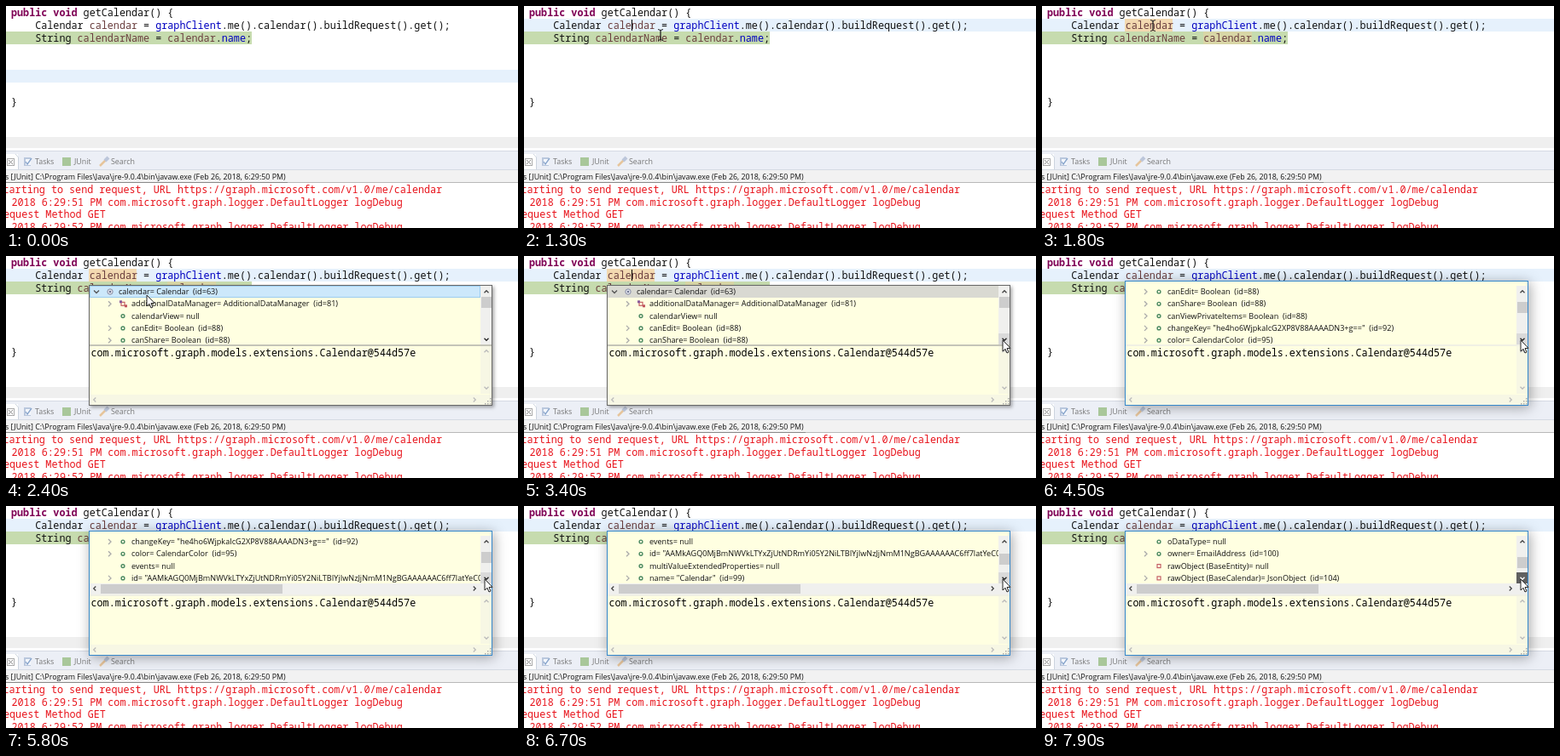
An HTML page with a canvas that plays this animation: 600 px wide and 261 px high, repeating every 8 s.

```html
<!DOCTYPE html>
<html lang="en">
<head>
<meta charset="utf-8">
<title>Inspecting a variable</title>
<style>
html, body { margin: 0; width: 100%; height: 100%; overflow: hidden; background: #fff; }
canvas { display: block; }
</style>
</head>
<body>
<canvas id="stage" width="600" height="261"></canvas>
<script>
const ctx = document.getElementById('stage').getContext('2d');
const LOOP = 8000, ROW = 14.3;
const MONO = '11.76px "Noto Sans Mono", monospace';
const UI = '9.1px "Open Sans", sans-serif';
const SMALL = '8.9px "Open Sans", sans-serif';
const BROWN = '#6a3e3e', BLUE = '#0000c0', RED = '#e8141c';

const CLICK = 1150, MARK = 1700, OPEN = 2050, FOCUS = 3850, HBAR = 5000;
// Each press of the scroll button moves the list by one row.
const PRESSES = [3900, 4130, 4350, 4700, HBAR, 5650, 6100, 6500, 6850, 7150, 7500, 7840];

// Pointer stops: time, x, y
const PATH = [
  [100, 456, 255], [850, 128, 22], [1160, 128, 22], [1290, 160, 34], [1400, 160, 34],
  [1650, 130, 23], [2080, 130, 23], [2330, 165, 46], [2750, 165, 46],
  [3350, 561, 99], [5450, 561, 99], [5600, 561, 86], [LOOP, 561, 86]
];

// Label, icon, expandable
const ROWS = [
  ['calendar= Calendar  (id=63)', 'local', 1],
  ['additionalDataManager= AdditionalDataManager  (id=81)', 'private', 1],
  ['calendarView= null', 'public', 0],
  ['canEdit= Boolean  (id=88)', 'public', 1],
  ['canShare= Boolean  (id=88)', 'public', 1],
  ['canViewPrivateItems= Boolean  (id=88)', 'public', 1],
  ['changeKey= "he4ho6WjpkaIcG2XP8V88AAAADN3+g=="  (id=92)', 'public', 1],
  ['color= CalendarColor  (id=95)', 'public', 1],
  ['events= null', 'public', 0],
  ['id= "AAMkAGQ0MjBmNWVkLTYxZjUtNDRmYi05Y2NiLTBIYjIwNzJjNmM1NgBGAAAAAAC6ff7latYeC0', 'public', 1],
  ['multiValueExtendedProperties= null', 'public', 0],
  ['name= "Calendar"  (id=99)', 'public', 1],
  ['oDataType= null', 'public', 0],
  ['owner= EmailAddress  (id=100)', 'public', 1],
  ['rawObject (BaseEntity)= null', 'hidden', 0],
  ['rawObject (BaseCalendar)= JsonObject  (id=104)', 'hidden', 1]
];

function box(x, y, w, h, color) {
  ctx.fillStyle = color;
  ctx.fillRect(x, y, w, h);
}

function frame(x, y, w, h, color) {
  ctx.strokeStyle = color;
  ctx.lineWidth = 1;
  ctx.strokeRect(x + .5, y + .5, w - 1, h - 1);
}

function text(str, x, y, font, color = '#111') {
  ctx.font = font;
  ctx.fillStyle = color;
  ctx.fillText(str, x, y);
  return x + ctx.measureText(str).width;
}

function code(x, y, ...parts) {
  for (const [str, color = '#111', bold] of parts)
    x = text(str, x, y, (bold ? 'bold ' : '') + MONO, color);
}

function line(points, color, width = 1) {
  ctx.beginPath();
  points.forEach(([x, y]) => ctx.lineTo(x, y));
  ctx.strokeStyle = color;
  ctx.lineWidth = width;
  ctx.stroke();
}

// dx, dy give the direction in which the chevron points
function chevron(x, y, dx, dy, color = '#999', s = 2.5) {
  const tail = k => [x - dx * s / 2 + k * dy * s, y - dy * s / 2 + k * dx * s];
  line([tail(-1), [x + dx * s / 2, y + dy * s / 2], tail(1)], color, 1.3);
}

function editor(t) {
  const y = t < CLICK ? 75 : 15;
  box(0, y, 600, 15, '#e6f1fc');
  box(0, 30, 288, 15, '#c6dbae');
  if (t >= MARK && t < FOCUS) {
    box(97, 15, 56, 15, '#f3d9b0');
    box(189, 30, 57, 15, '#d8d6a6');
  }
  code(6, 12, ['public void', '#7f0055', 1], [' getCalendar() {']);
  code(34.2, 27, ['Calendar '], ['calendar', BROWN], [' = '], ['graphClient', BLUE],
    ['.me().calendar().buildRequest().get();']);
  code(34.2, 42, ['String '], ['calendarName', BROWN], [' = '], ['calendar', BROWN],
    ['.'], ['name', BLUE], [';']);
  code(6, 117, ['}']);
  if (t >= CLICK && t < 1700 || t >= 2900 && t < 3700) box(126, 16, 1, 13, '#000');
}

function consolePane() {
  box(0, 154, 600, 13, '#efefef');
  box(0, 170, 600, 23, '#eceff6');
  box(0, 170, 600, 1, '#d5dae4');
  box(0, 174, 14, 19, '#fff');
  line([[11, 174], [14.5, 178], [14.5, 192]], '#ccd4de');
  frame(1, 179, 9, 9, '#aaa');
  line([[3, 181], [8, 186]], '#888');
  line([[8, 181], [3, 186]], '#888');

  box(21, 178, 8, 10, '#b9c7dd');
  box(23, 180, 6, 7, '#f4f7fc');
  line([[23, 183], [25, 186], [30, 179]], '#88a5cc', 1.3);
  text('Tasks', 34, 186, SMALL, '#777');
  box(66, 178, 10, 10, '#a9c79a');
  text('JUnit', 80, 186, SMALL, '#777');
  line([[110, 188], [117, 181]], '#e6c59c', 2.5);
  line([[116, 182], [120, 178]], '#bcc6da', 4);
  text('Search', 123, 186, SMALL, '#777');

  box(0, 193, 600, 14, '#f2f2f2');
  box(0, 192, 600, 1, '#d5dbe3');
  text('s [JUnit] C:\\Program Files\\Java\\jre-9.0.4\\bin\\javaw.exe (Feb 26, 2018, 6:29:50 PM)',
    -1, 204, SMALL);
  box(0, 207, 600, 1, '#b9b9b9');
  box(0, 207, 330, 1, '#888');

  const logger = ' PM com.microsoft.graph.logger.DefaultLogger logDebug';
  text('tarting to send request, URL https://graph.microsoft.com/v1.0/me/calendar', -3.5, 220, MONO, RED);
  text('2018 6:29:51' + logger, 6.5, 234.5, MONO, RED);
  text('equest Method GET', -3, 249, MONO, RED);
  text('2018 6:29:52' + logger, 6.5, 264, MONO, RED);
}

function icon(kind, x, y) {
  if (kind === 'local') {
    ctx.beginPath();
    ctx.arc(x, y, 3.2, 0, 7);
    ctx.fillStyle = '#d9dce6';
    ctx.fill();
    ctx.strokeStyle = '#8a8fa6';
    ctx.lineWidth = 1;
    ctx.stroke();
    box(x - 1, y - 1, 2, 2, '#6d7390');
  } else if (kind === 'public') {
    ctx.beginPath();
    ctx.arc(x, y, 1.9, 0, 7);
    ctx.strokeStyle = '#4c8a62';
    ctx.lineWidth = 1.4;
    ctx.stroke();
  } else {
    ctx.strokeStyle = '#c0545c';
    ctx.lineWidth = 1.1;
    ctx.strokeRect(x - 2, y - 2, 4, 4);
    if (kind === 'private') {
      box(x - 4, y - 4, 3, 3, '#8a5a9a');
      box(x + 2, y + 1, 3, 3, '#c0545c');
    }
  }
}

function popup(t) {
  const pos = PRESSES.filter(p => t >= p).length;
  const hbar = t >= HBAR, focused = t >= FOCUS;
  const hot = t >= 2280 && t < 2830;
  const top = focused ? 29 : 34, bottom = hbar ? 91 : 104;
  const pressed = PRESSES.some(p => t >= p - 30 && t < p + 110);

  ctx.save();
  ctx.shadowColor = 'rgba(0,0,0,.35)';
  ctx.shadowBlur = focused ? 14 : 4;
  ctx.shadowOffsetX = ctx.shadowOffsetY = 2;
  box(97, top, 473, 176 - top, '#ffffe1');
  ctx.restore();

  ctx.save();
  ctx.beginPath();
  ctx.rect(98, 35, 458, bottom - 35);
  ctx.clip();
  if (pos === 0) {
    box(98, 35, 458, 14, hot ? '#cce8fb' : '#d9d9d2');
    if (hot) frame(98, 35, 458, 14, '#9ccdf0');
  }
  ROWS.slice(pos, pos + 5).forEach(([label, kind, opens], i) => {
    const y = 42 + i * ROW, root = kind === 'local', x = root ? 122 : 137;
    if (root) chevron(106, y, 0, 1, '#555', 3);
    else if (opens) chevron(121.5, y, 1, 0, '#aaa', 3);
    icon(kind, x, y);
    text(label, x + 10, y + 3, UI);
  });
  ctx.restore();

  // List scroll bars
  box(556, 35, 13, bottom - 35, '#f0f0ee');
  chevron(563, 42, 0, -1, '#444');
  box(557, 48 + pos * (hbar ? 1 : 2), 12, 13, '#cdcdcd');
  if (t >= 3300) box(556, bottom - 13, 13, 13, pressed ? '#606060' : '#dadada');
  chevron(563, bottom - 6, 0, 1, pressed ? '#fff' : '#222');
  if (hbar) {
    box(98, 91, 471, 13, '#f0f0ee');
    chevron(104, 97, -1, 0, '#444');
    box(111, 92, 213, 11, '#cdcdcd');
    chevron(549, 97, 1, 0, '#444');
  }

  // Detail pane
  box(98, 104, 471, 2, focused ? '#f0f0e4' : '#c4c4b8');
  text('com.microsoft.graph.models.extensions.Calendar@544d57e', 99.5, 118, MONO, '#000');
  box(556, 106, 13, 56, '#f7f7e4');
  box(98, 163, 471, 12, '#f7f7e4');
  chevron(563, 112, 0, -1, '#bbb');
  chevron(563, 155, 0, 1, '#bbb');
  chevron(104, 169, -1, 0, '#bbb');
  chevron(549, 169, 1, 0, '#bbb');
  for (let i = 0; i < 3; i++)
    for (let j = 0; j <= i; j++) box(567 - j * 3, 167 + i * 3, 1.5, 1.5, '#aaa');
  frame(97, top, 473, 176 - top, focused ? '#3588cc' : '#686868');
}

function pointer(t) {
  if (t < PATH[0][0]) return;
  const i = Math.max(1, PATH.findIndex(p => p[0] > t));
  const [t0, x0, y0] = PATH[i - 1], [t1, x1, y1] = PATH[i];
  const k = (t - t0) / (t1 - t0), e = k * k * (3 - 2 * k);
  const x = x0 + (x1 - x0) * e, y = y0 + (y1 - y0) * e;
  if (y < 160 && t < OPEN) {
    line([[x - 3, y - 6.5], [x, y - 5.5], [x + 3, y - 6.5]], '#222');
    line([[x, y - 6], [x, y + 6]], '#222', 1.3);
    line([[x - 3, y + 6.5], [x, y + 5.5], [x + 3, y + 6.5]], '#222');
    return;
  }
  ctx.beginPath();
  [[0, 0], [0, 13], [3, 10.3], [5, 15], [7, 14], [5, 9.6], [9, 9.3]]
    .forEach(([dx, dy]) => ctx.lineTo(x + dx, y + dy));
  ctx.closePath();
  ctx.fillStyle = '#fff';
  ctx.fill();
  ctx.strokeStyle = '#222';
  ctx.lineWidth = 1;
  ctx.stroke();
}

function draw(now) {
  const t = now % LOOP;
  box(0, 0, 600, 261, '#fff');
  editor(t);
  consolePane();
  if (t >= OPEN) popup(t);
  pointer(t);
}

const start = performance.now();
function tick() {
  draw(performance.now() - start);
  requestAnimationFrame(tick);
}
tick();
</script>
</body>
</html>
```
